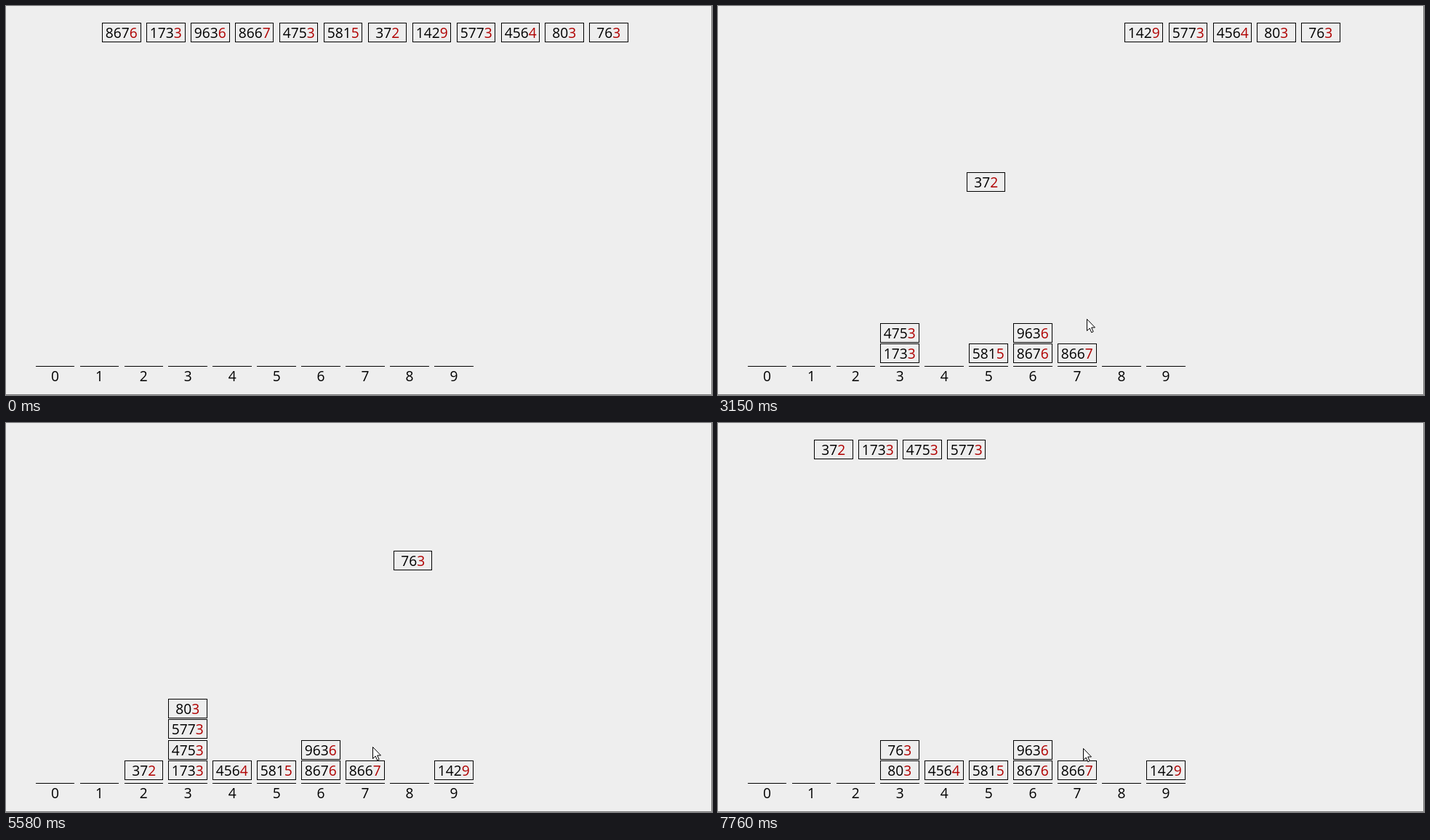
An HTML page for the animation above (8000 ms loop, 971x536 px).

```html
<!DOCTYPE html>
<html lang="en">
<head>
<meta charset="utf-8">
<title>Radix sort</title>
<style>
  html, body { margin: 0; width: 100%; height: 100%; overflow: hidden; background: #eee; }
  svg { display: block; }
  text { font: 19.2px "Open Sans", "Noto Sans", sans-serif; text-anchor: middle; }
  .key { fill: #b00000; }
  .box { fill: none; stroke: #000; }
  .edge { fill: none; stroke: #777; }
</style>
</head>
<body>
<svg id="stage" width="971" height="536" viewBox="0 0 971 536"></svg>
<script>
const LOOP = 8000;
const FIRST = 230, BEAT = 484.67, STEP = 120;
const PITCH = 60.94, WIDTH = 53.6;
const values = [8676, 1733, 9636, 8667, 4753, 5815, 372, 1429, 5773, 4564, 803, 763];

// Pointer rests: time, x, y
const rests = [
  [1570, 77, 492], [1690, 507, 431], [3630, 504, 446], [6060, 503, 448], [6550, 502, 448]
];

const stage = document.getElementById('stage');

function add(parent, tag, attrs = {}, text = '') {
  const el = document.createElementNS('http://www.w3.org/2000/svg', tag);
  for (const name in attrs) el.setAttribute(name, attrs[name]);
  el.textContent = text;
  parent.append(el);
  return el;
}

const place = (el, x, y) => el.setAttribute('transform', `translate(${x} ${y})`);
const columnX = n => 40.65 + PITCH * n;
const pixelWidth = x => Math.round(x + WIDTH) - Math.round(x);
const slot = i => ({ x: columnX(i + 1.5), y: 23 });
const shelf = (digit, level) => ({ x: columnX(digit), y: 465 - 28.3 * level });
const moveStart = n => FIRST + BEAT * n;

// Linear travel, shown in coarse steps
function progress(elapsed) {
  return elapsed < 0 ? 0 : Math.min(1, 0.466 + 0.5 * Math.floor(elapsed / STEP));
}

const blend = (a, b, p) => ({ x: a.x + (b.x - a.x) * p, y: a.y + (b.y - a.y) * p });

for (let d = 0; d < 10; d++) {
  const x = columnX(d);
  add(stage, 'rect', { x: Math.round(x), y: 496, width: pixelWidth(x), height: 1 });
  add(stage, 'text', { x: x + WIDTH / 2, y: 517 }, d);
}
add(stage, 'path', { class: 'edge', d: 'M970.5 0V535.5H0' });

const sorted = [...values].sort((a, b) => a % 10 - b % 10);

const cards = values.map((value, i) => {
  const el = add(stage, 'g');
  const box = add(el, 'rect', { class: 'box', x: 0.5, y: 0.5, height: 26 });
  const label = add(el, 'text', { x: WIDTH / 2, y: 21 }, Math.floor(value / 10));
  add(label, 'tspan', { class: 'key' }, value % 10);
  const rank = sorted.indexOf(value);
  return {
    el, box,
    digit: value % 10,
    from: slot(i),
    to: slot(rank),
    dropAt: moveStart(i),
    takeAt: moveStart(values.length + rank)
  };
});

const pointer = add(stage, 'path', {
  d: 'M.5 .5V16.5L4.2 13L6.7 18.8L9.2 17.7L6.7 12H11.5Z', fill: '#fff', stroke: '#000'
});

function position(card, i, t) {
  if (t >= card.takeAt) {
    return blend(shelf(card.digit, 0), card.to, progress(t - card.takeAt));
  }
  const below = cards.slice(0, i).filter(c => c.digit === card.digit && c.takeAt > t);
  return blend(card.from, shelf(card.digit, below.length), progress(t - card.dropAt));
}

function draw(t) {
  cards.forEach((card, i) => {
    const { x, y } = position(card, i, t);
    place(card.el, Math.round(x), Math.round(y));
    card.box.setAttribute('width', pixelWidth(x) - 1);
  });

  const rest = rests.filter(r => r[0] <= t).pop();
  pointer.style.display = rest ? '' : 'none';
  if (rest) place(pointer, rest[1], rest[2]);
}

function tick() {
  draw(performance.now() % LOOP);
  requestAnimationFrame(tick);
}
tick();
</script>
</body>
</html>
```
